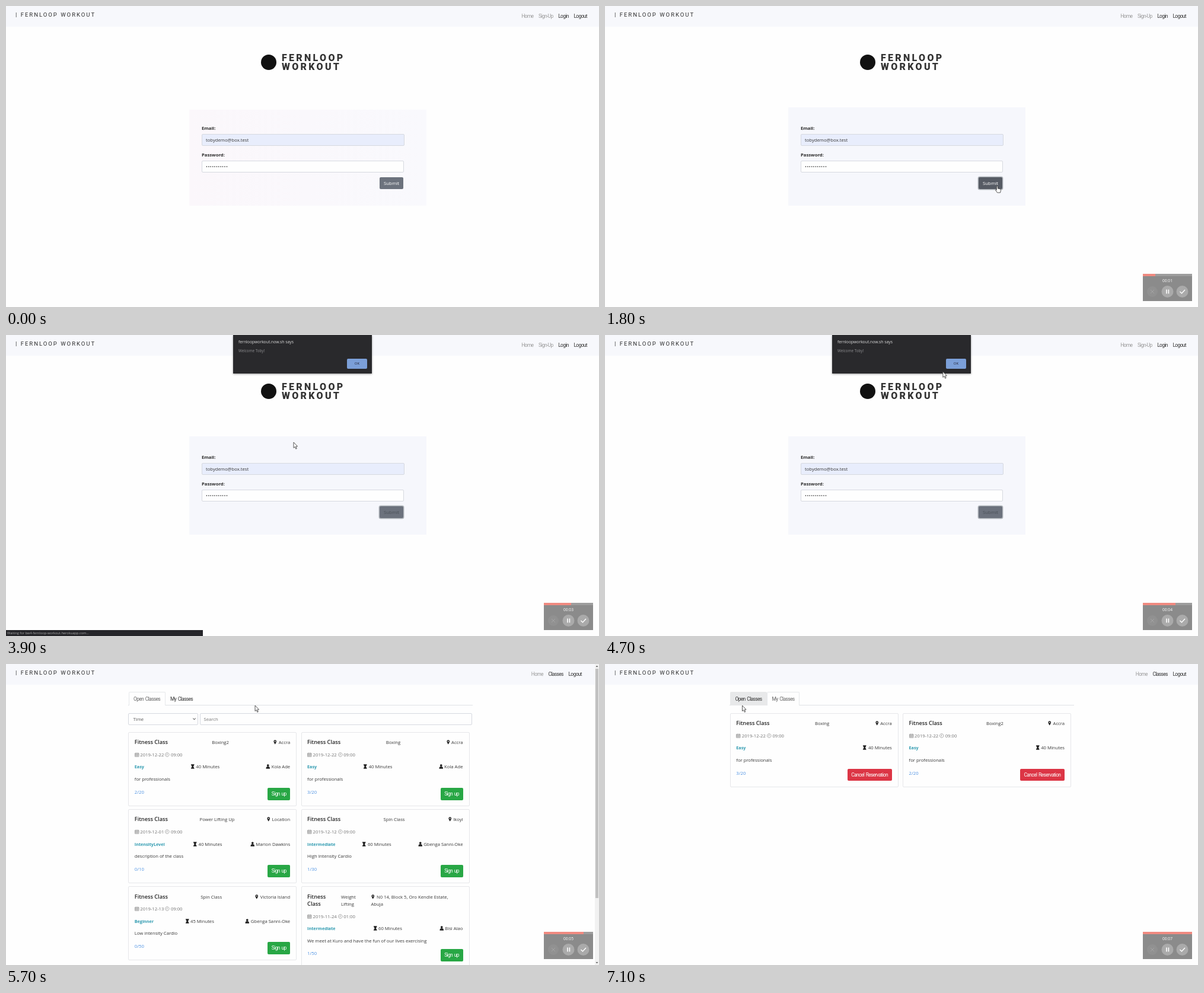
Write an HTML page that moves like this. It is 1000 px wide and 508 px high and loops after 7200 ms.

```html
<!DOCTYPE html>
<html lang="en">
<head>
<meta charset="utf-8">
<title>Class booking demo</title>
<style>
html, body { margin: 0; width: 100%; height: 100%; overflow: hidden; background: #fefefe; }
body { position: relative; font: 7.7px/12.4px "Open Sans", "Noto Sans", sans-serif; color: #383838; }
body > *, #login > *, #classes > *, #filters > *, #recorder > *, #alert > *, .card { position: absolute; box-sizing: border-box; white-space: nowrap; }
svg { overflow: visible; }
.tight { font: 8.5px/12px Roboto, sans-serif; letter-spacing: -.66px; word-spacing: 1.2px; }

#header { left: 0; top: 0; width: 100%; height: 35px; background: #f7f8fc; }
#brand { left: 16px; top: 9px; font: 9.5px/12px Roboto, sans-serif; letter-spacing: 2px; color: #2a2a2a; }
nav { top: 11px; right: 20px; display: flex; gap: 8.6px; color: #333; }
nav .dim { color: #999; }

#login, #classes { left: 0; top: 0; width: 1000px; height: 508px; }
#dot { left: 430px; top: 82px; width: 26px; height: 26px; border-radius: 50%; background: #111; }
#wordmark { left: 465px; top: 80px; font: 900 16px/15px Roboto, sans-serif; letter-spacing: 3.3px; color: #333; }
#panel { left: 309px; width: 400px; }
.label { left: 330px; font-weight: 700; color: #2a2a2a; }
.field { border: 1px solid #d6d9e0; border-radius: 2px; height: 20px; line-height: 18px; padding-left: 6px; background: #fefefe; }
#email { left: 330px; top: 216px; width: 342px; background: #e8edfc; }
#pass { left: 330px; top: 261px; width: 341px; font-size: 7.7px; letter-spacing: .5px; }
#submit { left: 630px; top: 289px; width: 40px; height: 20px; border-radius: 2px; font-size: 7.9px; line-height: 20px; text-align: center; }

.tab { top: 47px; height: 23px; line-height: 22px; border: 1px solid transparent; border-bottom: 0; border-radius: 2px 2px 0 0; text-align: center; color: #333; }
.tab.on { background: #fefefe; border-color: #e6e8eb; color: #666; }
.tab.hover { background: #e8e9ea; }
#openTab { left: 211px; width: 62px; }
#myTab { left: 273px; width: 55px; }
#rule { left: 210px; top: 69px; width: 581px; height: 1px; background: #dfe2e5; }
#time { left: 210px; top: 83px; width: 118px; padding-left: 8px; color: #555; }
#time svg { position: absolute; right: 3px; top: 7px; }
#search { left: 331px; top: 83px; width: 459px; color: #777; }

.card { width: 284px; min-height: 125px; padding: 10.3px 10px 9px 9.6px; border: 1px solid #e6e7ea; border-radius: 2px; display: flex; flex-direction: column; gap: 8.2px; }
.row { display: flex; justify-content: space-between; }
.card b { font-weight: 600; font-size: 9.2px; color: #222; }
.card i { font: 700 7.2px/12.4px "Open Sans", sans-serif; color: #2e9ab0; }
.card .date { color: #707070; }
.card .count { color: #4a90e2; margin-top: 1px; }
.card .btn { height: 21px; line-height: 20px; padding: 0 6.6px; border-radius: 2px; color: #fff; background: #28a745; }
.card .cancel { background: #dc3545; height: 20px; }
.wide { width: 155px; }
.icon { height: 8px; width: 7.5px; margin-right: 2px; vertical-align: -1px; fill: #222; }
.icon.line { fill: none; stroke: #777; stroke-width: 1.3; }

#scroll { right: 0; top: 0; width: 7px; height: 508px; background: #f1f1f1; }
#scroll div { margin: 8px 1px; height: 387px; background: #c1c1c1; }
#scroll svg { position: absolute; left: 0; top: 0; }
#alert { left: 383px; top: 0; width: 234px; height: 65px; background: #29292c; box-shadow: 0 1px 3px #0006; font-size: 6.8px; color: #ddd; }
#host { left: 9px; top: 6px; }
#hello { left: 9px; top: 21px; font-size: 6.3px; color: #8f8f92; }
#ok { left: 192px; top: 40px; width: 34px; height: 17px; border-radius: 2px; background: #7b9fd8; color: #223; font-size: 6px; line-height: 17px; text-align: center; }
#status { left: 0; top: 498px; width: 332px; height: 10px; background: #26262a; color: #aaa; font-size: 5.7px; line-height: 11px; padding-left: 2px; }
#recorder { left: 907px; top: 452px; width: 83px; height: 46px; background: #8b8b8b; }
#track { width: 83px; height: 4px; background: #9d9d9d; }
#bar { height: 4px; background: #f08a80; }
#clock { width: 83px; top: 6px; text-align: center; color: #fff; font-size: 6.6px; }
#cursor { left: 0; top: 0; width: 1px; height: 1px; }
</style>
</head>
<body>
<div id="header"></div>
<div id="brand">| FERNLOOP WORKOUT</div>
<nav id="nav" class="tight"></nav>

<div id="login">
  <div id="dot"></div>
  <div id="wordmark">FERNLOOP<br>WORKOUT</div>
  <div id="panel"></div>
  <div class="label" style="top:199.5px">Email:</div>
  <div class="field" id="email">tobydemo@box.test</div>
  <div class="label" style="top:244.5px">Password:</div>
  <div class="field" id="pass">•••••••••••</div>
  <div id="submit">Submit</div>
</div>

<div id="classes">
  <div id="rule"></div>
  <div id="openTab">Open Classes</div>
  <div id="myTab">My Classes</div>
  <div id="filters">
    <div class="field" id="time">Time
      <svg width="5" height="4"><path d="M.5 .5 2.5 3 4.5 .5" fill="none" stroke="#333"/></svg></div>
    <div class="field" id="search">Search</div>
  </div>
  <div id="list"></div>
  <div id="mine"></div>
</div>

<div id="scroll"><div></div>
  <svg width="7" height="508" fill="#666"><path d="M1.5 5 3.5 2.5 5.5 5zM1.5 503 3.5 505.5 5.5 503z"/></svg>
</div>
<div id="alert">
  <div id="host">fernloopworkout.now.sh says</div>
  <div id="hello">Welcome Toby!</div>
  <div id="ok">OK</div>
</div>
<div id="status">Waiting for bw4-fernloop-workout.herokuapp.com...</div>
<div id="recorder">
  <div id="track"></div><div id="bar"></div><div id="clock"></div>
  <svg width="83" height="46" fill="none" stroke="#fff">
    <g stroke="none" fill="#aaa"><circle cx="16" cy="30" r="9" fill="#919191"/><circle cx="41.5" cy="30" r="10"/><circle cx="66.5" cy="30" r="10"/></g>
    <path d="M13 27l6 6m0-6l-6 6" stroke="#a4a4a4"/>
    <path d="M40 26.5v7m3.4-7v7" stroke-width="1.6"/>
    <path d="M62.5 30l3 3 5.5-6" stroke-width="1.4"/>
  </svg>
</div>
<svg id="cursor" fill="#fff" stroke="#444" stroke-width=".9">
  <path id="arrow" d="M0 0V9.5L2.2 7.6 3.8 11.3 5.3 10.6 3.8 7H6.6z"/>
  <path id="hand" d="M1 0Q2.2-.8 2.4 .8V4L6.8 5Q7.8 5.5 7.4 7.5L6.6 11H1.6L-1.6 6.6Q-1.6 5.2 .4 6.6V1z"/>
  <path id="beam" d="M-2-4Q0-4 0-3 0-4 2-4M0-3V3M-2 4Q0 4 0 3 0 4 2 4" fill="none"/>
</svg>

<script>
const $ = id => document.getElementById(id);
const show = (id, on) => { $(id).style.display = on ? '' : 'none'; };

const shapes = {
  pin: 'M8 0a5 5 0 0 0-5 5c0 4 5 11 5 11s5-7 5-11a5 5 0 0 0-5-5zm0 3a2 2 0 1 0 0 4 2 2 0 0 0 0-4z',
  user: 'M8 0a4 4 0 1 0 .01 0zM1 16c0-6 2-8 7-8s7 2 7 8z',
  glass: 'M2 0h12v2h-1c0 3-1 4-3 6 2 2 3 3 3 6h1v2H2v-2h1c0-3 1-4 3-6C4 6 3 5 3 2H2z',
  date: 'M1 3h14v12H1zM1 6h14M5 1v3M11 1v3M5 6v9M10 6v9M1 10h14',
  clock: 'M8 1a7 7 0 1 0 .01 0zM8 4v5H5'
};
const icon = (name, line = '') =>
  `<svg class="icon ${line}" viewBox="0 0 16 16"><path fill-rule="evenodd" d="${shapes[name]}"/></svg>`;

function card(i, top, [kind, place, day, hour, level, mins, coach, about, count]) {
  const wrapped = place.includes('<br>');
  return `<div class="card" style="left:${210.7 + i % 2 * 291.3}px;top:${top + (i >> 1) * 130.2}px">
    <div class="row"><b>Fitness${wrapped ? '<br>' : ' '}Class</b><span>${kind}</span>
      <span class="${wrapped ? 'wide' : ''}">${icon('pin')}${place}</span></div>
    <div class="date">${icon('date', 'line')}${day} ${icon('clock', 'line')}${hour}:00</div>
    <div class="row"><i>${level}</i><span>${icon('glass')}${mins} Minutes</span>${coach ? `<span>${icon('user')}${coach}</span>` : ''}</div>
    <div>${about}</div>
    <div class="row"><span class="count">${count}</span>
      <span class="btn tight ${coach ? '' : 'cancel'}">${coach ? 'Sign up' : 'Cancel Reservation'}</span></div>
  </div>`;
}

const boxing = (kind, coach, count) =>
  [kind, 'Accra', '2019-12-22', '09', 'Easy', 40, coach, 'for professionals', count];
$('list').innerHTML = [
  boxing('Boxing2', 'Kola Ade', '2/20'),
  boxing('Boxing', 'Kola Ade', '3/20'),
  ['Power Lifting Up', 'Location', '2019-12-01', '09', 'IntensityLevel', 40, 'Marion Dawkins', 'description of the class', '0/10'],
  ['Spin Class', 'Ikoyi', '2019-12-12', '09', 'Intermediate', 60, 'Gbenga Sanni-Oke', 'High Intensity Cardio', '1/30'],
  ['Spin Class', 'Victoria Island', '2019-12-13', '09', 'Beginner', 45, 'Gbenga Sanni-Oke', 'Low intensity Cardio', '0/50'],
  ['Weight<br>Lifting', 'N0 14, Block 5, Oro Kendle Estate,<br>Abuja', '2019-11-24', '01', 'Intermediate', 60, 'Bisi Alao', 'We meet at Kuro and have the fun of our lives exercising', '1/50']
].map((c, i) => card(i, 115, c)).join('');
$('mine').innerHTML = [boxing('Boxing', '', '3/20'), boxing('Boxing2', '', '2/20')]
  .map((c, i) => card(i, 83, c)).join('');

// Pointer stops: time, x, y
const stops = [
  [100, 720, 430], [900, 690, 340], [1400, 660, 304], [1900, 660, 304], [2400, 520, 235],
  [2800, 470, 125], [3300, 475, 175], [3900, 485, 181], [4500, 560, 70], [5000, 588, 47],
  [5100, 588, 47], [5300, 560, 61], [5700, 420, 70], [6200, 306.5, 62], [6400, 306.5, 62], [7100, 231.5, 70]
];
function pointer(t) {
  const n = stops.findIndex(s => s[0] > t);
  if (n < 1) return stops[n ? stops.length - 1 : 0].slice(1);
  const a = stops[n - 1], b = stops[n];
  const u = (t - a[0]) / (b[0] - a[0]), k = u * u * (3 - 2 * u);
  return [a[1] + (b[1] - a[1]) * k, a[2] + (b[2] - a[2]) * k];
}

function draw(t) {
  const inside = t >= 5200, listed = t >= 5700 && t < 6400, mine = t >= 6400;
  const [x, y] = pointer(t);

  const links = inside ? ['Home', 'Classes', 'Logout'] : ['Home', 'Sign-Up', 'Login', 'Logout'];
  $('nav').innerHTML = links.map((s, i) =>
    `<span class="${i < links.length - 2 ? 'dim' : ''}">${s}</span>`).join('');
  $('nav').style.right = (listed ? 29 : 20) + 'px';

  show('login', !inside);
  const first = t < 100, over = t >= 1300 && t < 2000, busy = t >= 2000;
  Object.assign($('panel').style, {
    top: (first ? 175 : 171) + 'px', height: (first ? 162 : 166) + 'px',
    background: first ? 'linear-gradient(90deg, #fbf7fb, #f9f9fd)' : '#f6f7fc'
  });
  Object.assign($('submit').style, {
    background: over ? '#565b64' : '#6c727d', color: busy ? '#4a5158' : '#fff',
    boxShadow: t >= 1600 ? '0 0 0 1.5px #b4b9be' : 'none'
  });

  show('classes', inside);
  $('classes').style.left = (listed ? -4.5 : 0) + 'px';
  $('openTab').className = 'tight tab ' + (!mine ? 'on' : x < 273 ? 'hover' : '');
  $('myTab').className = 'tight tab ' + (mine ? 'on' : x < 328 ? 'hover' : '');
  show('filters', !mine);
  show('list', listed);
  show('mine', mine);
  show('scroll', listed);

  const fade = Math.max(0, (t - 5100) / 300);
  show('alert', t >= 3600 && t < 5400);
  $('alert').style.opacity = Math.max(0, 1 - fade * 1.1);
  $('alert').style.transform = `translateY(${-12 * fade}px)`;
  show('status', t >= 3600 && t < 4500);

  show('recorder', !first);
  $('bar').style.width = Math.min(83, t * .0117) + 'px';
  $('clock').textContent = '00:0' + Math.floor(t / 1000);

  show('cursor', !first);
  $('cursor').style.transform = `translate(${x}px, ${y}px)`;
  const shape = over ? 'hand' : t >= 6000 && t < 6800 ? 'beam' : 'arrow';
  for (const s of ['arrow', 'hand', 'beam']) show(s, s === shape);
}

const start = performance.now();
let last = -1;
function tick() {
  const t = Math.floor((performance.now() - start) % 7200 / 100) * 100;
  if (t !== last) draw(last = t);
  requestAnimationFrame(tick);
}
tick();
</script>
</body>
</html>
```
